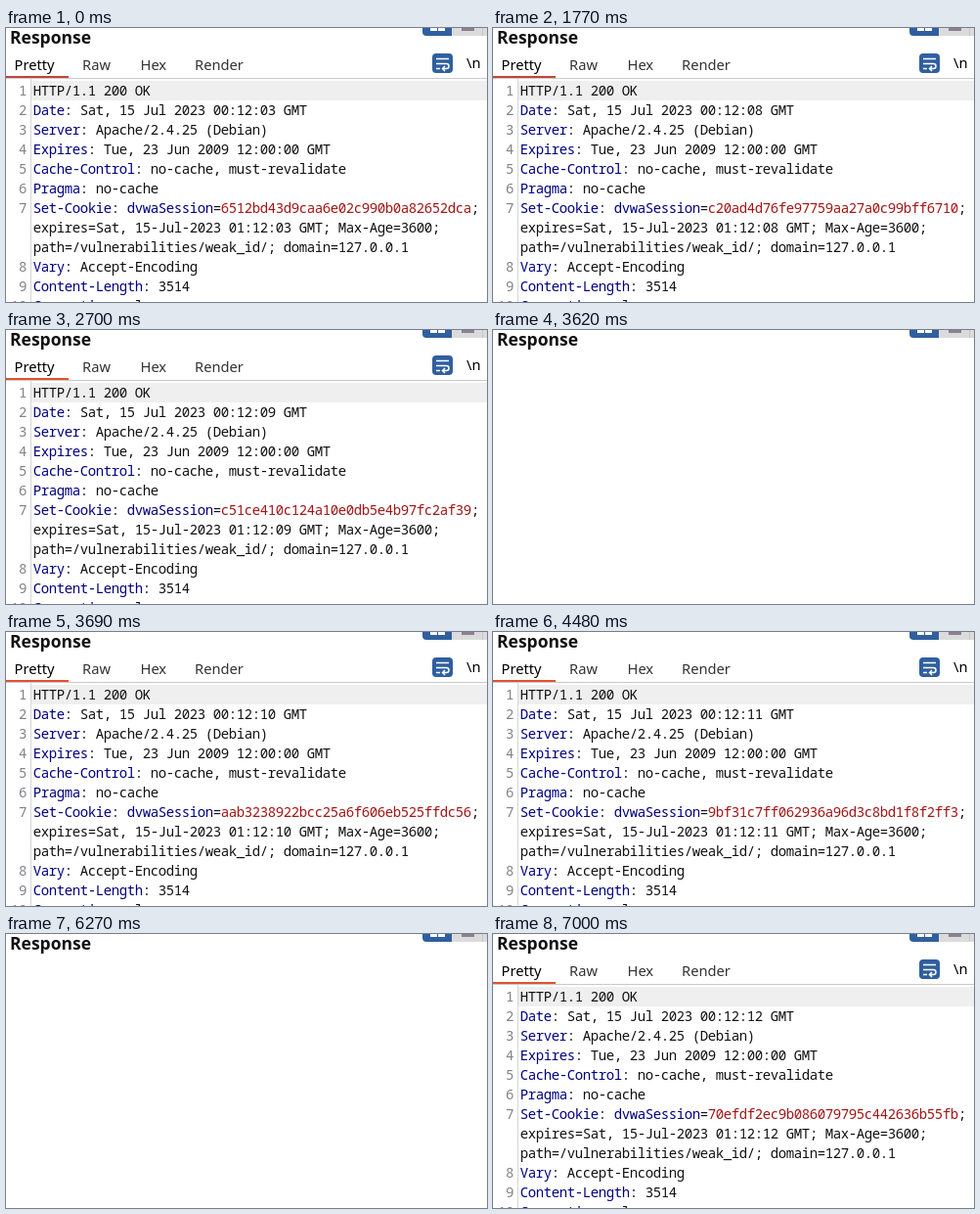
Animation, 492 px wide and 280 px high, one loop 8.33 s. Source, as an HTML page:

```html
<!DOCTYPE html>
<html lang="en">
<head>
<meta charset="utf-8">
<title>Response</title>
<style>
  html, body { margin: 0; width: 100%; height: 100%; overflow: hidden; background: #fff; }
  svg { display: block; }
  text { white-space: pre; }
  .title { font: bold 17.5px "Noto Sans", sans-serif; fill: #111; }
  .tab { font: 14.7px "Noto Sans", sans-serif; fill: #333; }
  .active { fill: #000; }
  .code { font: 14px "Noto Sans Mono", monospace; letter-spacing: -0.4px; fill: #111; }
  .number { fill: #85808a; text-anchor: end; }
  .name { fill: #00007f; }
  .value { fill: #a31515; }
</style>
</head>
<body>
<svg width="492" height="280" viewBox="0 0 492 280">
  <text class="title" x="4" y="16">Response</text>
  <path d="M426 0H456V8H430Q426 8 426 4Z" fill="#2f5f9f"/>
  <path d="M456 0H487V8H456ZM488 0H492V8H488Z" fill="#dcdbdc"/>
  <path d="M487 0H488V8H487Z" fill="#c6c4c6"/>
  <path d="M434 0H441V3H434ZM442 0H449V3H442Z" fill="#fff"/>
  <path d="M466 0H479V3H466Z" fill="#8c8090"/>
  <g id="panel">
    <text class="tab active" x="8.5" y="43">Pretty</text>
    <text class="tab" x="78" y="43">Raw</text>
    <text class="tab" x="137.5" y="43">Hex</text>
    <text class="tab" x="193" y="43">Render</text>
    <rect x="436" y="26" width="21" height="20" rx="4" fill="#2f5f9f"/>
    <path d="M440 31.5H453M440 36.5H450.5Q453 36.5 453 39T450.5 41.5H447M440 41.5H444M449 39L446.5 41.5L449 44"
      fill="none" stroke="#fff" stroke-width="1.5"/>
    <text class="tab active" x="471" y="40.5">\n</text>
    <rect y="51" width="492" height="1" fill="#c9c9c9"/>
    <rect id="underline" y="49" width="64" height="2"/>
    <rect x="26" y="54" width="466" height="20" fill="#efefef"/>
    <rect x="25" y="52" width="1" height="228" fill="#d6d6d6"/>
    <g id="code"></g>
  </g>
</svg>
<script>
const LOOP = 8330;
const FIRST_RELOAD = 2640;

// Start time, seconds shown in the response, session id; no id means an empty panel.
const states = [
  [0, "03", "6512bd43d9caa6e02c990b0a82652dca"],
  [1770, "08", "c20ad4d76fe97759aa27a0c99bff6710"],
  [FIRST_RELOAD],
  [2700, "09", "c51ce410c124a10e0db5e4b97fc2af39"],
  [3620],
  [3690, "10", "aab3238922bcc25a6f606eb525ffdc56"],
  [4480, "11", "9bf31c7ff062936a96d3c8bd1f8f2ff3"],
  [5410, "11", "c74d97b01eae257e44aa9d5bade97baf"],
  [6270],
  [6340, "12", "70efdf2ec9b086079795c442636b55fb"],
];

const panel = document.getElementById("panel");
const underline = document.getElementById("underline");
const code = document.getElementById("code");
const span = (kind, text) => `<tspan class="${kind}">${text}</tspan>`;
const header = (name, value) => `${span("name", name)}: ${value}`;

const response = (seconds, id) => [
  [1, "HTTP/1.1 200 OK"],
  [2, header("Date", `Sat, 15 Jul 2023 00:12:${seconds} GMT`)],
  [3, header("Server", "Apache/2.4.25 (Debian)")],
  [4, header("Expires", "Tue, 23 Jun 2009 12:00:00 GMT")],
  [5, header("Cache-Control", "no-cache, must-revalidate")],
  [6, header("Pragma", "no-cache")],
  [7, header("Set-Cookie", `${span("name", "dvwaSession")}=${span("value", id)};`)],
  ["", `expires=Sat, 15-Jul-2023 01:12:${seconds} GMT; Max-Age=3600;`],
  ["", "path=/vulnerabilities/weak_id/; domain=127.0.0.1"],
  [8, header("Vary", "Accept-Encoding")],
  [9, header("Content-Length", "3514")],
  [10, header("Connection", "close")],
];

function show([start, seconds, id]) {
  panel.style.display = id ? "" : "none";
  if (!id) return;
  underline.style.fill = start < FIRST_RELOAD ? "#c0453a" : "#e0532f";
  code.innerHTML = response(seconds, id).map(([number, text], row) => {
    const y = 69 + row * 20;
    return `<text class="code number" x="21" y="${y}">${number}</text>
      <text class="code" x="27.8" y="${y}">${text}</text>`;
  }).join("");
}

let current;
function tick() {
  const time = performance.now() % LOOP;
  const state = states.findLast(([start]) => start <= time);
  if (state !== current) show(current = state);
  requestAnimationFrame(tick);
}
tick();
</script>
</body>
</html>
```
